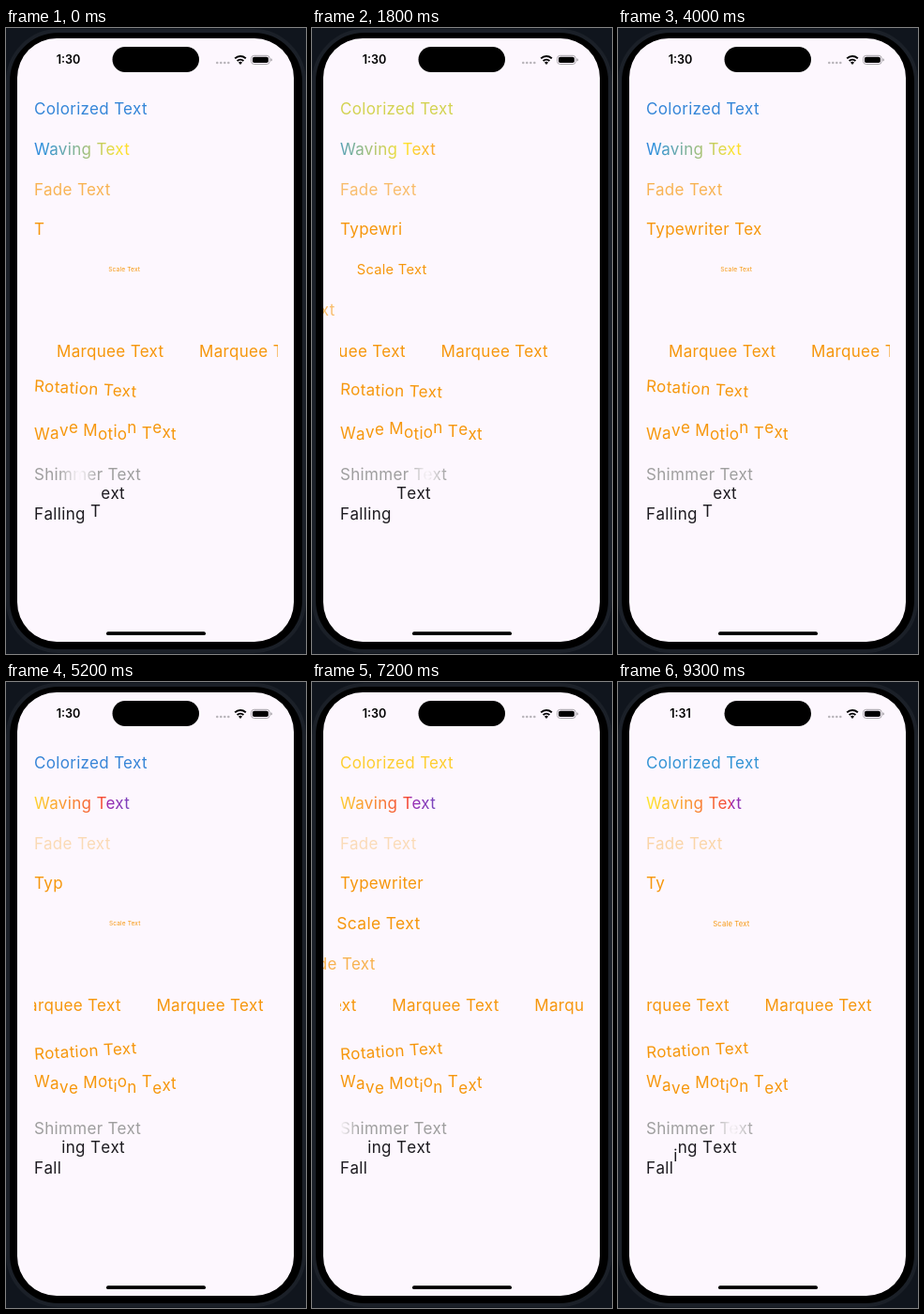
An HTML page for the animation above (9400 ms loop, 320x666 px).

```html
<!DOCTYPE html>
<html lang="en">
<head>
<meta charset="utf-8">
<title>Text effects</title>
<style>
  html, body { margin: 0; width: 100%; height: 100%; overflow: hidden; background: #10151d; }
  #stage { position: relative; width: 320px; height: 666px; overflow: hidden; }
  #phone { position: absolute; inset: 1px 0; box-sizing: border-box; border: 4px solid #1b2028; border-radius: 56px; background: #000; }
  #screen { position: absolute; left: 11.7px; top: 11px; width: 295.6px; height: 641.6px; border-radius: 42px; overflow: hidden; background: #fdf7fe; }
  #page { position: absolute; left: -11.7px; top: -11px; width: 320px; height: 666px; }
  #page > svg { position: absolute; left: 0; top: 0; }
  .row {
    position: absolute; left: 30px; width: 260px; height: 20px; margin-top: -10px;
    font: 400 17px/20px Inter, "Liberation Sans", sans-serif; letter-spacing: .33px;
    white-space: pre; color: #f6970c;
  }
  .row span { position: relative; }
  #wave, #shimmer { color: transparent; -webkit-background-clip: text; background-clip: text; }
  #wave { background-image: linear-gradient(90deg, #9c27b0, #2b90dc, #ffe52e, #f44336); background-size: 260px 100%; }
  #marquee { overflow: hidden; }
  #marquee span { position: absolute; left: 0; top: 0; }
  #motion, #fall { font-kerning: none; }
  #fall { color: #1d1b20; }
  #clock { font: 600 12.6px Inter, "Liberation Sans", sans-serif; }
</style>
</head>
<body>
<div id="stage">
  <div id="phone"></div>
  <div id="screen"><div id="page">
    <div class="row" id="color" style="top:86px">Colorized Text</div>
    <div class="row" id="wave" style="top:129px">Waving Text</div>
    <div class="row" id="fade" style="top:171.5px">Fade Text</div>
    <div class="row" id="type" style="top:214px"></div>
    <div class="row" id="scale" style="top:256.5px">Scale Text</div>
    <div class="row" id="slide" style="top:299.5px">Slide Text</div>
    <div class="row" id="marquee" style="top:344px"><span>Marquee Text</span><span>Marquee Text</span><span>Marquee Text</span></div>
    <div class="row" id="turn" style="top:388px">Rotation Text</div>
    <div class="row" id="motion" style="top:428.5px">Wave Motion Text</div>
    <div class="row" id="shimmer" style="top:474.5px">Shimmer Text</div>
    <div class="row" id="fall" style="top:517px">Falling Text</div>
    <svg width="320" height="666" viewBox="0 0 320 666">
      <text id="clock" x="66.5" y="38.3" text-anchor="middle">1:30</text>
      <rect x="113.5" y="20" width="92.5" height="27" rx="13.5"/>
      <g fill="#b8b4ba">
        <circle cx="225.3" cy="37" r="1.3"/><circle cx="229.3" cy="37" r="1.3"/>
        <circle cx="233.3" cy="37" r="1.3"/><circle cx="237.3" cy="37" r="1.3"/>
      </g>
      <g fill="none" stroke="#000" stroke-width="2">
        <path d="M244.2 32.4a8.3 8.3 0 0 1 11.6 0"/>
        <path d="M246.6 35a5 5 0 0 1 6.8 0"/>
      </g>
      <path d="M250 38.9l-2-2.1a2.9 2.9 0 0 1 4 0z"/>
      <rect x="261.6" y="29.3" width="19.6" height="9.2" rx="3" fill="none" stroke="#a8a4aa"/>
      <rect x="263" y="30.7" width="16.8" height="6.4" rx="1.8"/>
      <path d="M282.4 32.3q1.6 .4 1.6 1.6t-1.6 1.6z" fill="#a8a4aa"/>
      <rect x="107" y="642.3" width="106" height="3.8" rx="1.9"/>
    </svg>
  </div></div>
</div>
<script>
  const LOOP = 9400, STEP = 100, START = 605, CYCLE = 2000;
  const $ = id => document.getElementById(id);
  const mod = (a, n) => ((a % n) + n) % n;
  const clamp = v => Math.min(1, Math.max(0, v));
  const mix = (a, b, k) => a + (b - a) * k;

  // cubic-bezier(.42, 0, .58, 1)
  function easeInOut(x) {
    let lo = 0, hi = 1;
    for (let i = 0; i < 20; i++) {
      const s = (lo + hi) / 2, r = 1 - s;
      if (1.26 * r * r * s + 1.74 * r * s * s + s * s * s < x) lo = s; else hi = s;
    }
    return lo * lo * (3 - 2 * lo);
  }

  const palette = [[156, 39, 176], [43, 144, 220], [255, 229, 46], [244, 67, 54]];
  function paletteAt(x) {
    const p = x * 3, i = Math.min(2, Math.floor(p));
    return `rgb(${palette[i].map((c, k) => Math.round(mix(c, palette[i + 1][k], p - i)))})`;
  }

  function split(el) {
    const chars = [...el.textContent];
    el.textContent = '';
    return chars.map(c => {
      const s = document.createElement('span');
      s.textContent = c;
      el.append(s);
      return s;
    });
  }

  const typed = 'Typewriter Text', motionText = $('motion').textContent;
  const motion = split($('motion')), fall = split($('fall'));
  const copies = [...$('marquee').children];

  // short stutter that is caught up again
  const lag = t => t < 6100 ? 0 : 105 * clamp((7500 - t) / 1400);

  function draw(clock) {
    const t = clock - lag(clock);
    const saw = mod(t - START, CYCLE) / CYCLE;
    const round = mod(t - START, 2 * CYCLE) / CYCLE;
    const swing = round < 1 ? round : 2 - round;
    const eased = easeInOut(swing);

    $('clock').textContent = clock < 8600 ? '1:30' : '1:31';
    $('color').style.color = paletteAt(swing);
    $('wave').style.backgroundPositionX = 260 * saw + 'px';
    $('fade').style.opacity = saw;
    $('type').textContent = typed.slice(0, Math.round(mod(t / 300 + .66, 15)));
    $('scale').style.transform = `scale(${.2 + eased})`;
    $('slide').style.transform = `translateX(${260 * (eased - 1)}px)`;
    $('slide').style.opacity = swing;
    copies.forEach((c, i) => c.style.transform = `translateX(${152 * (i - round / 2) + 1}px)`);
    $('turn').style.transform = `rotate(${mix(-5.4, 5.4, easeInOut(saw))}deg)`;
    motion.forEach((s, i) => {
      const phase = motionText.indexOf(motionText[i]);
      s.style.top = -3.8 * Math.sin(2 * Math.PI * saw + phase) + 'px';
    });
    const glow = -103.5 + .15 * mod(t + 1010, 1500);
    $('shimmer').style.backgroundImage =
      `linear-gradient(90deg, #9e9e9e ${glow - 21}px, #fbf6fb ${glow}px, #9e9e9e ${glow + 21}px)`;
    fall.forEach((s, i) => s.style.top = -22 * (1 - clamp(2.3 * (12 * saw - i))) + 'px');
  }

  const begin = performance.now();
  function tick() {
    const t = (performance.now() - begin) % LOOP;
    draw(Math.floor(t / STEP) * STEP);
    requestAnimationFrame(tick);
  }
  tick();
</script>
</body>
</html>
```
